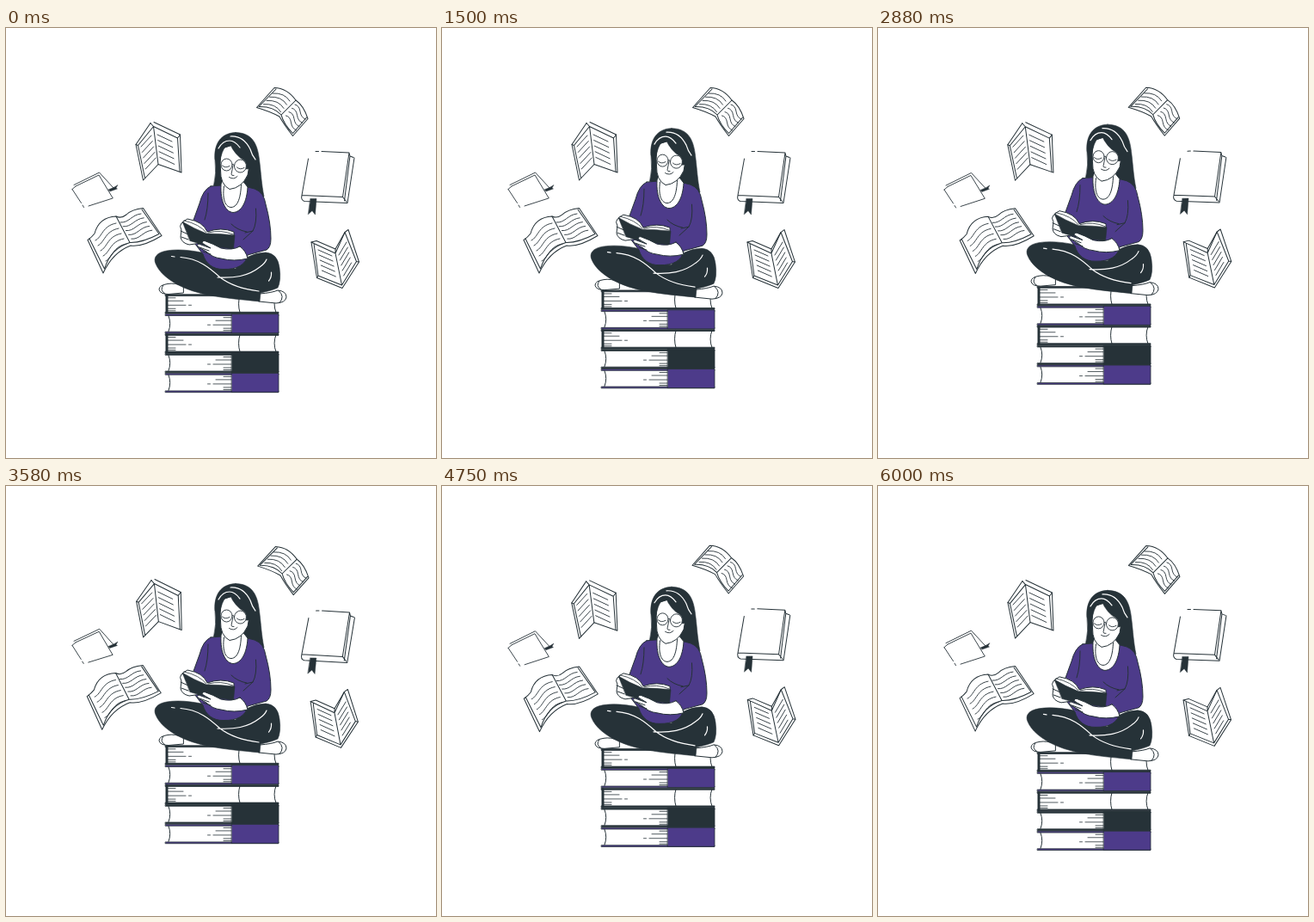
Write an HTML page that moves like this. It is 500 px wide and 500 px high and loops after 6.04 s.

```html
<!DOCTYPE html>
<html lang="en">
<head>
<meta charset="utf-8">
<style>
html, body { margin: 0; width: 100%; height: 100%; overflow: hidden; background: #fff }
svg { display: block; width: 100vw; height: 100vh }
path { stroke: #263238; stroke-linecap: round; stroke-linejoin: round; fill: none }
.w { fill: #fff }
.d { fill: #263238 }
.p { fill: #4d3b8a }
.l { stroke: #fff; stroke-width: 1.2 }
</style>
</head>
<body>
<svg viewBox="0 0 500 500">
<g id="books">
  <!-- open, upper right -->
  <path class="w" d="M312 69.500L291.500 92.500Q307 97 318 103Q323 112 333.500 125.500L351 105.500Q346 90 337 84Q327 70 312 69.500Z"/>
  <path d="M314 71L294 91.500Q311 91 320 101L337 84M320 101Q323 112 333.500 122.500L349.500 104"/>
  <!-- standing, upper left -->
  <path class="w" d="M168 110.500L151 135.500L159.500 177L177 158.500L204 168L202.500 124L172 109.500"/>
  <path d="M168 110.500L171.500 114.500L177 158.500M171.500 114.500L153.500 136.500L161.500 174.500M171.500 114.500L199.500 128L202 167M199.500 128L202.500 124M151 135.500L153.500 136.500"/>
  <!-- small, closed -->
  <path d="M79 182.500L108.500 168L125 186M81 184L108 171L124 197.500M77 187.500L87.500 203.500M89 206L90.500 208.500M96 207L124 198M77 187.500L81 184" stroke-width=".9"/>
  <path class="d" d="M119 188L126 185L130 182.500L128 186L129.500 187L121 190Z" stroke-width=".4"/>
  <!-- open, left -->
  <path class="w" d="M95 246.500L113 285Q124 261 145 253Q159 255 181 241.500L159.500 209.500Q146 211 140 217Q134 222 128 219Q108 220 103 239Q100 243 95 246.500Z"/>
  <path d="M97 245L114.500 280Q122 256 144 249.500L128 219M144 249.500Q158 250 178 239.500L158 211"/>
  <!-- large, closed -->
  <path d="M360 143.500H363.500M367 143.500L399 145L391.500 196.500L344 194.500L351.500 152M344 194.500Q342.500 200 347 201.500L397 203.500L405 151M399 145L400 149L404 150.500M400 149L393.500 201M391.500 196.500L396 202"/>
  <path class="d" d="M354 198.500H361L359.500 217L356 212.500L351.500 216.500Z" stroke-width=".5"/>
  <!-- standing, lower right -->
  <path class="w" d="M355 249L361.500 290.500L391 302.500L410.500 272L398 234.500L394 237.500L383 257L361 247.500Z"/>
  <path d="M355 249L358 250.500L383 262L390.500 299M383 257V262L394 237.500L407.500 271.500L390.500 299L363 288L361.500 290.500M358 250.500L363 288M407.500 271.500L410.500 272"/>
</g>
<g id="reader">
  <g id="stack"></g>
  <!-- hair behind the shoulders -->
  <path class="d" stroke-width=".6" d="M267 121.500C249 122 241.500 136 243 153Q245 169 241.500 183Q262 190 300 196C297 181 296.500 169 295 157C293 135 287 122 267 121.500Z"/>
  <!-- shoes -->
  <path class="w" d="M206 300Q196 296 188 297.500Q178 299 178 304Q179 309.500 189 309.500L206 308ZM183 299Q178 305 185 309"/>
  <path class="w" d="M295 309Q309 308 316 305Q326 306 326 313Q325 319.500 314 320L294 318ZM317 305.500Q325 312 318 319.500"/>
  <!-- legs -->
  <path class="d" stroke-width=".6" d="M232 262C214 258 199 257 187 259C175 261 171 267 174 274C178 284 189 294 207 302C232 313 267 315 295 318L296 308Q310 305 316 302Q320 294 318 279Q316 262 302 261Q278 262 267 280L244 279Z"/>
  <path class="l" d="M192.500 265.500L196 266M203 266.500C224 268 237 279 249 290C262 300 278 304 294 306M246 290C265 291 281 289 295 278Q301 274 303 269M305.500 294Q309 290 308.500 284"/>
  <!-- body -->
  <path class="p" d="M238 184L250 183L281 185L289 187Q300 191 302 205Q308 227 308 245Q308 255 303 258L281 264C279 275 269 281 253 280.500C241 281 232 274 229 263L216 246L217 226L225 204Q229 188 238 184Z"/>
  <path d="M290.500 210Q292 227 287 236L276 246M287 236L278 238M280 237Q269 235 262 228M235 192Q235 211 231 223"/>
  <path class="w" d="M250 182C249 203 256 214 264 214.500C274 214 280 202 281 185L274 176L253 173Z"/>
  <path d="M253.500 184C251 201 256 208.500 262 208.500C270 208 273 196 273.500 182"/>
  <!-- face -->
  <path class="w" d="M252 140Q248 149 249.500 165Q249 182 260 187.500Q274 186 281 171L284 154L268 135Z"/>
  <path d="M263 159A6.500 7 0 1 1 250 159A6.500 7 0 1 1 263 159Q264 157 265.500 160A7 7.500 0 1 0 279.500 161A7 7.500 0 1 0 265.500 160M251.500 160Q255 163.500 260 160.500M268.500 162Q272 165.500 277 162.500M264 160L262 170Q262 172 265 171.500M259.500 173.500Q265 177 269 172.500" stroke-width=".9"/>
  <!-- fringe -->
  <path class="d" stroke-width=".5" d="M260 134C254 137 251 144 249 154L243 153Q243 129 262 124Q280 122 289 139L294 157Q290 161 289 157.500Q284 165 279 164Q281 158 277 154Q266 148 260 134Z"/>
  <path class="l" d="M247 140Q252 131 260 131Q266 131 272 139M261 126Q276 125 284 141Q286 148 290 153"/>
  <!-- held book, hands and forearm -->
  <path class="w" d="M215 226Q208 224 204 227Q201 230 204 235L203 243Q204 250 213 252L227 250V232Z"/>
  <path class="w" d="M206 225L211 222Q229 225 234 237Q250 231 265 237V244L232 254L210 235Z"/>
  <path class="d" stroke-width=".6" d="M205.500 225.500Q218 233 233 239Q248 239 266 241L264.500 257Q249 255 235 253Q225 251 214 247.500Z"/>
  <path d="M207 224Q225 228 233 238M235 238Q250 234 264 240" stroke-width=".8"/>
  <path class="w" d="M272 254Q263 259 250 256Q241 251 231 247.500Q228 247 228 250L238 256L224 251Q221 252 224 255L233 260Q240 267 250 268Q265 272 281 268Q279 259 272 254Z"/>
  <path d="M225 255L236 259M229 260L238 263M203 236L212 240M204 243L212 246"/>
</g>
</svg>
<script>
const $ = id => document.getElementById(id);
const add = (g, d, cls = '', width = 1) =>
  g.insertAdjacentHTML('beforeend', `<path class="${cls}" d="${d}" stroke-width="${width}"/>`);

// n copies of a stroke, each moved on by (dx, dy)
function rows(n, x, y, dx, dy, shape) {
  for (let i = 0; i < n; i++) add(books, `M${x + dx * i} ${y + dy * i}${shape}`, '', 0.9);
}

// kind: cover colour class, or '' for a book seen from its page side
function stackBook(y, kind) {
  const hatch = (x, dir) => {
    const row = (dy, from, to) => `M${x + dir * from} ${y + dy}H${x + dir * to}`;
    add(stack, row(4, 0, 9) + row(7.5, 0, 18) + row(12.5, 0, 21) + row(12.5, 24.5, 27.5)
      + row(16.5, 0, 9) + row(19, 0, 9), '', 0.8);
  };
  const cover = top => `M185.500 ${top}H317v1.800H185.500Z`;
  add(stack, `M186 ${y}H316.500V${y + 22}H186Z`, 'w', 0);
  add(stack, cover(y) + cover(y + 20.5), kind || 'd', 0.8);
  if (kind) {
    add(stack, `M262.500 ${y}H316Q317 ${y} 317 ${y + 1}V${y + 21}Q317 ${y + 22} 316 ${y + 22}H262.500Z`, kind, 0.8);
    add(stack, `M189 ${y + 2}Q192.500 ${y + 11} 189 ${y + 20}`);
    hatch(262, -1);
  } else {
    add(stack, `M187 ${y + 1}V${y + 21}`, '', 3);
    add(stack, `M272 ${y + 1}Q269 ${y + 11} 272 ${y + 21}M314 ${y + 1}Q310 ${y + 11} 314 ${y + 21}`);
    hatch(188, 1);
  }
}

const books = $('books'), reader = $('reader'), stack = $('stack');
['', 'p', '', 'd', 'p'].forEach((kind, i) => stackBook(309.8 + i * 22.9, kind));

rows(4, 310, 76, -3.5, 4.2, 'q14 -1 20 9');
rows(4, 336, 89, -3.5, 4.3, 'q5 1 6 8t6 9');
rows(5, 157, 138, 1.3, 6.5, 'l12 -13');
rows(5, 176, 124, .7, 6.6, 'l17 8');
rows(5, 104, 247, 3, 6, 'c8 -4 8 -17 24 -20');
rows(5, 133, 226, 3.2, 4.8, 'c10 1 13 -9 24 -10');
rows(5, 363, 258, 1.1, 6, 'l16 7');
rows(5, 387, 264, 1.4, 6, 'l9 -15');

const LOOP = 6040, SWAY = LOOP / 2;
function draw(now) {
  const t = now % LOOP;
  const rise = 9.8 * (1 - Math.abs(1 - 2 * t / LOOP));
  // triangle wave: 0, 1, 0, -1 degrees
  const angle = 1 - Math.abs((4 * t / SWAY + 1) % 4 - 2);
  reader.setAttribute('transform', `translate(0 ${-rise})`);
  books.setAttribute('transform', `rotate(${angle} 244 185)`);
  requestAnimationFrame(draw);
}
draw(performance.now());
</script>
</body>
</html>
```
